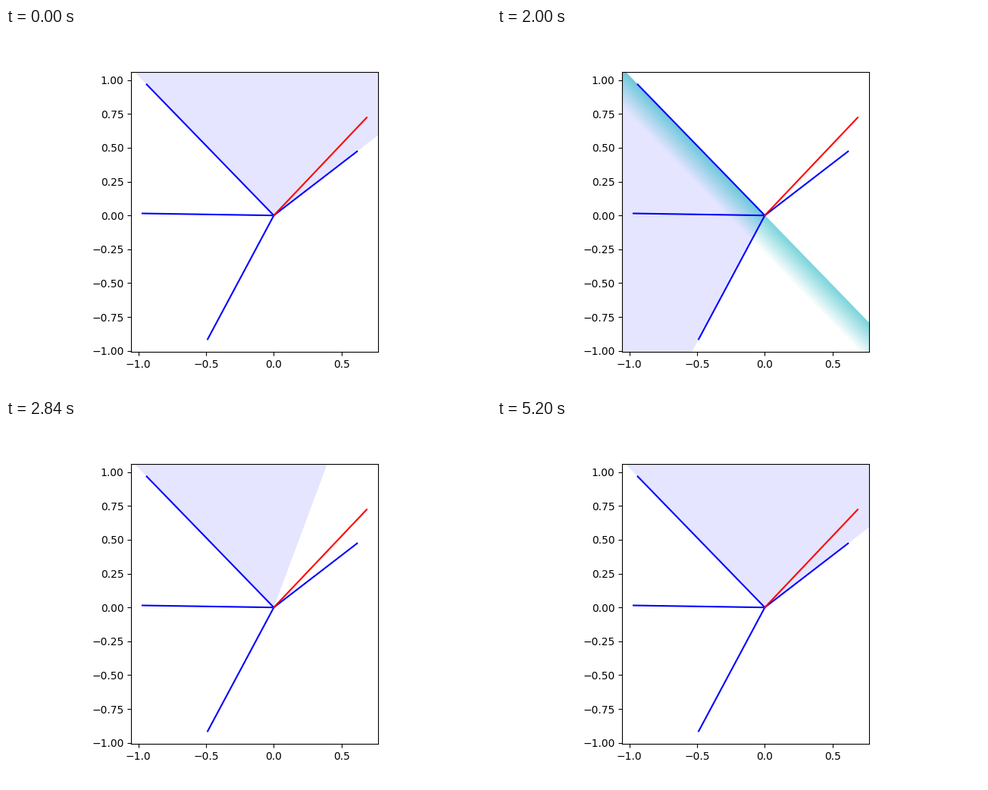
Animation, 640 px wide and 480 px high, one loop 6.4 s. Source, as a matplotlib script:

```python
import numpy as np
import matplotlib.pyplot as plt
from matplotlib.animation import FuncAnimation

STEP = 20            # ms per frame
LOOP = 6400          # ms per loop
XLIM = (-1.0538, 0.7693)
YLIM = (-1.008, 1.0616)
BAND = 0.2           # width of the half-plane shading
BAND_STEPS = 30

PIVOT = (-0.9395, 0.9676)
INNER = (-0.971, 0.015)
LEAVING = (-0.489, -0.914)
ENTERING = (0.6153, 0.473)
TARGET = (0.6864, 0.723)


def angle(v):
    return np.arctan2(v[1], v[0]) % (2 * np.pi)


A_PIVOT, A_OUT, A_IN = angle(PIVOT), angle(LEAVING), angle(ENTERING)

fig, ax = plt.subplots(figsize=(6.4, 4.8), dpi=100)
ax.set(xlim=XLIM, ylim=YLIM, aspect="equal")


def ray(v, color):
    return ax.plot([0, v[0]], [0, v[1]], color=color, lw=1.5)[0]


for vec in (PIVOT, INNER, LEAVING):
    ray(vec, "blue")
entering = ray(ENTERING, "blue")
target = ray(TARGET, "red")


def cone_points(a, b, radius=4):
    arc = np.linspace(a, b, 40)
    rim = radius * np.column_stack([np.cos(arc), np.sin(arc)])
    return np.vstack([[0, 0], rim])


cone = plt.Polygon(cone_points(A_PIVOT, A_IN), fc="blue", alpha=0.1, lw=0, zorder=1)
ax.add_patch(cone)

# Signed distance from the pivot line, sampled over the axes.
W, H = 652, 740
px = (XLIM[1] - XLIM[0]) / W
xs = XLIM[0] + (np.arange(W) + 0.5) * px
ys = YLIM[0] + (np.arange(H) + 0.5) * (YLIM[1] - YLIM[0]) / H
gx, gy = np.meshgrid(xs, ys)
depth = -np.sin(A_PIVOT) * gx + np.cos(A_PIVOT) * gy

shade = np.zeros((H, W, 4))
shade[..., :3] = (0, 0.68, 0.73)
band = ax.imshow(shade, extent=(*XLIM, *YLIM), origin="lower",
                 aspect="equal", zorder=1.5)


def shade_band(reach):
    fade = np.clip(1 - depth / BAND, 0, 1)
    cover = np.clip(depth / px + 0.5, 0, 1) * np.clip((reach - depth) / px + 0.5, 0, 1)
    shade[..., 3] = 0.53 * fade * cover
    band.set_data(shade)


def edge_angle(t):
    if t < STEP or t >= 3220:
        return A_IN
    if t < 2200:
        return A_OUT
    k = (t - 2200) / STEP
    s = 1 / (1 + np.exp(-0.238 * (k - 24.93)))
    return A_OUT + (A_IN - A_OUT) * s


def blink_on(t, start):
    """Two 200 ms gaps, 200 ms apart."""
    return not (0 <= t - start < 600 and (t - start) // 200 % 2 == 0)


def draw(i):
    t = i * STEP
    cone.set_xy(cone_points(A_PIVOT, edge_angle(t)))
    shown = 620 <= t < 2200
    band.set_visible(shown)
    if shown:
        n = min((t - 600) // STEP, BAND_STEPS)
        shade_band(BAND * n / BAND_STEPS)
    entering.set_visible(blink_on(t, 1400))
    target.set_visible(blink_on(t, 4600))
    return cone, band, entering, target


anim = FuncAnimation(fig, draw, frames=LOOP // STEP, interval=STEP,
                     init_func=lambda: draw(0), repeat=True, repeat_delay=0)
plt.show()
```
